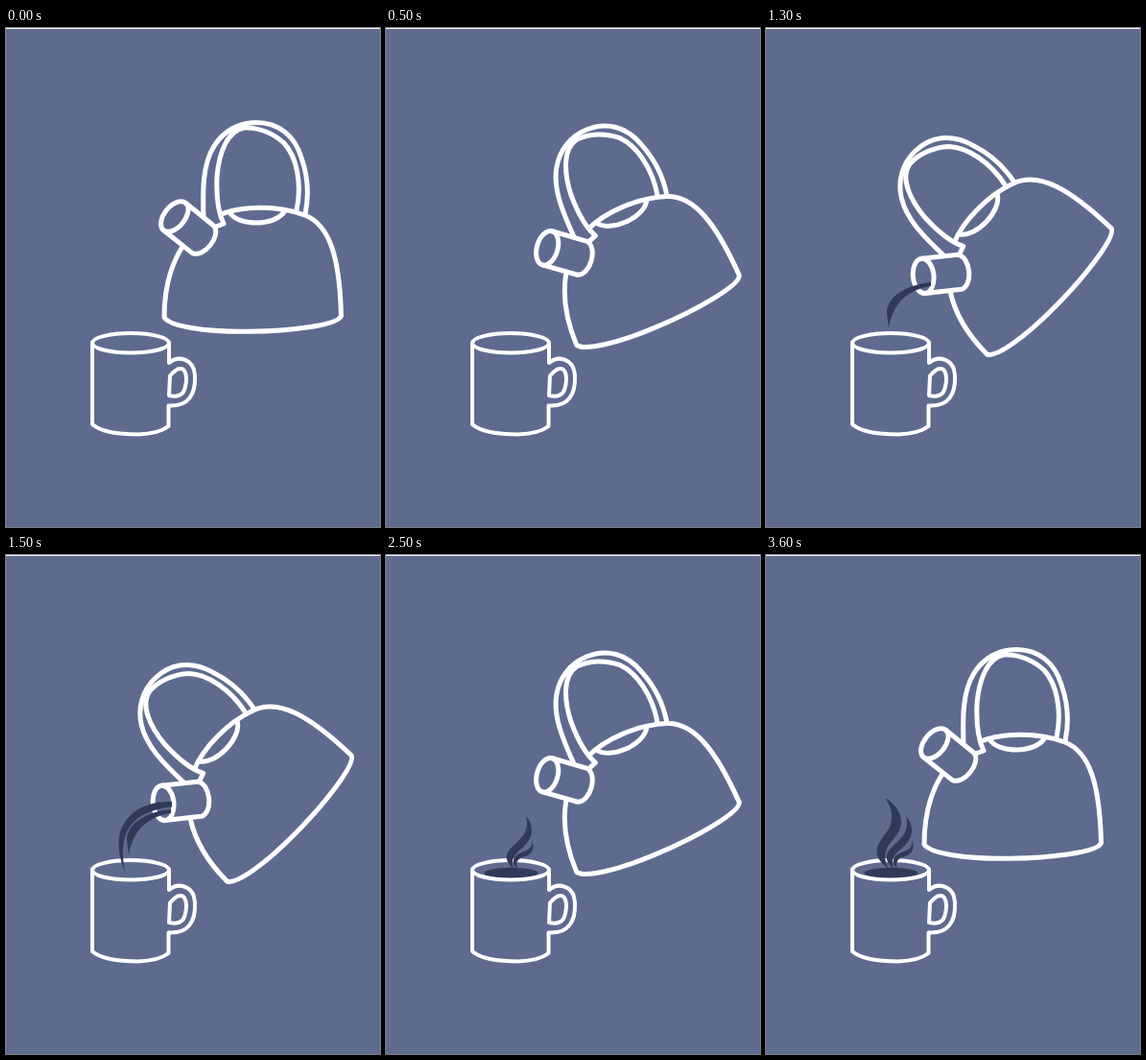
These frames come from a looping animation (390x520 px, 4000 ms). An HTML page:

```html
<!DOCTYPE html>
<html lang="en">
<head>
<meta charset="utf-8">
<title>Kettle and mug</title>
<style>
  html, body { margin: 0; width: 100%; height: 100%; overflow: hidden; background: #5e6b8f; }
  svg { display: block; width: 100%; height: 100%; }
  .line { fill: none; stroke: #fff; stroke-linejoin: round; }
  .dark { fill: #2f3a58; }
</style>
</head>
<body>
<svg viewBox="0 0 390 520">
  <rect width="390" height="1" fill="#fff"/>
  <ellipse class="dark" data-show="5 8" cx="130.5" cy="331.5" rx="28" ry="5.8"/>

  <g class="line" stroke-width="4">
    <ellipse cx="130" cy="328.3" rx="40" ry="10.2"/>
    <path d="M90 328.5V413C99 421 118 423.5 138 423.5C153 423 163 420 169.5 415V393.5
             C190 395 198 382 197 362C196 344 179 341 170 349V328.5"/>
    <path d="M171 362.5C174 359 176 357 179 355.5C186 353 188 359 188 367C187 379 184 386 170 383Z"/>
  </g>

  <g id="kettle" class="line" stroke-width="5">
    <path d="M184 228C170.5 249 165 275 165 301.5C171 311 207 316.3 247 316.3
             C297 316.3 346.5 309.5 349.5 300C348 240 338 205 311.5 195C283 184.5 246 185 222 195"/>
    <path d="M233 192C242 207 282 207 291 190"/>
    <path d="M206 198C205 168 205 142 217 123C227 107 243 98.5 261 98.5
             C284 98.5 301 112 308 135C315 155 316 175 312 194"/>
    <path d="M216 208L227 204C221 192 219 178 220 155C222 130 231 107 248 104
             C262 103 278 109 290 120C303 134 309 162 303 190"/>
    <g transform="translate(175.8 196.5) rotate(39)">
      <ellipse rx="10.8" ry="18.3"/>
      <path d="M0 -18.3H38C51 -15 51 15 38 18L0 18.3"/>
    </g>
  </g>

  <g class="dark">
    <path data-show="2 5" d="M172 265C150 267 126 278 126 297L128 313C131 294 141 274 172 269Z"/>
    <path data-show="3 5" d="M173 257C140 256 117 274 117.5 302C118 314 121 323 124.5 331C118 298 122 268 173 262.5Z"/>
    <path data-show="4 5" d="M173 249C135 247 110 262 110.5 292C111 302 113 310 115.5 317C112 286 120 257 173 255Z"/>
    <path data-show="4 8" d="M152 297C154 307 145 308 139 311C131 315 131 322 137 327C135 321 137 317 142 315C152 313 156 306 152 297Z"/>
    <path data-show="5 8" d="M146 272C150 285 143 294 135 301C123 311 123 318 133 327C130 318 133 313 140 307C152 298 157 285 146 272Z"/>
    <path data-show="6 8" d="M124 253C134 267 133 280 125 290C112 305 112 316 128 327C121 314 124 306 133 296C146 283 143 264 124 253Z"/>
  </g>
</svg>
<script>
  const STEP = 500, LOOP = 4000;
  const kettle = document.getElementById('kettle');
  const parts = [...document.querySelectorAll('[data-show]')].map(el => {
    const [from, to] = el.dataset.show.split(' ').map(Number);
    return { el, from, to };
  });
  // Each tilt: shift x, shift y, angle about the middle of the base
  const tilts = [[0, 0, 0], [26.3, -7.2, -22.7], [38, -27.2, -45]];
  const poses = [0, 1, 2, 2, 2, 1, 0, 0];

  function draw(now) {
    const step = Math.floor(now % LOOP / STEP);
    const [x, y, angle] = tilts[poses[step]];
    kettle.setAttribute('transform', `translate(${x} ${y}) rotate(${angle} 258.5 301)`);
    for (const { el, from, to } of parts)
      el.style.display = step >= from && step < to ? '' : 'none';
  }

  let start;
  function tick(now) {
    start ??= now;
    draw(now - start);
    requestAnimationFrame(tick);
  }
  draw(0);
  requestAnimationFrame(tick);
</script>
</body>
</html>
```
